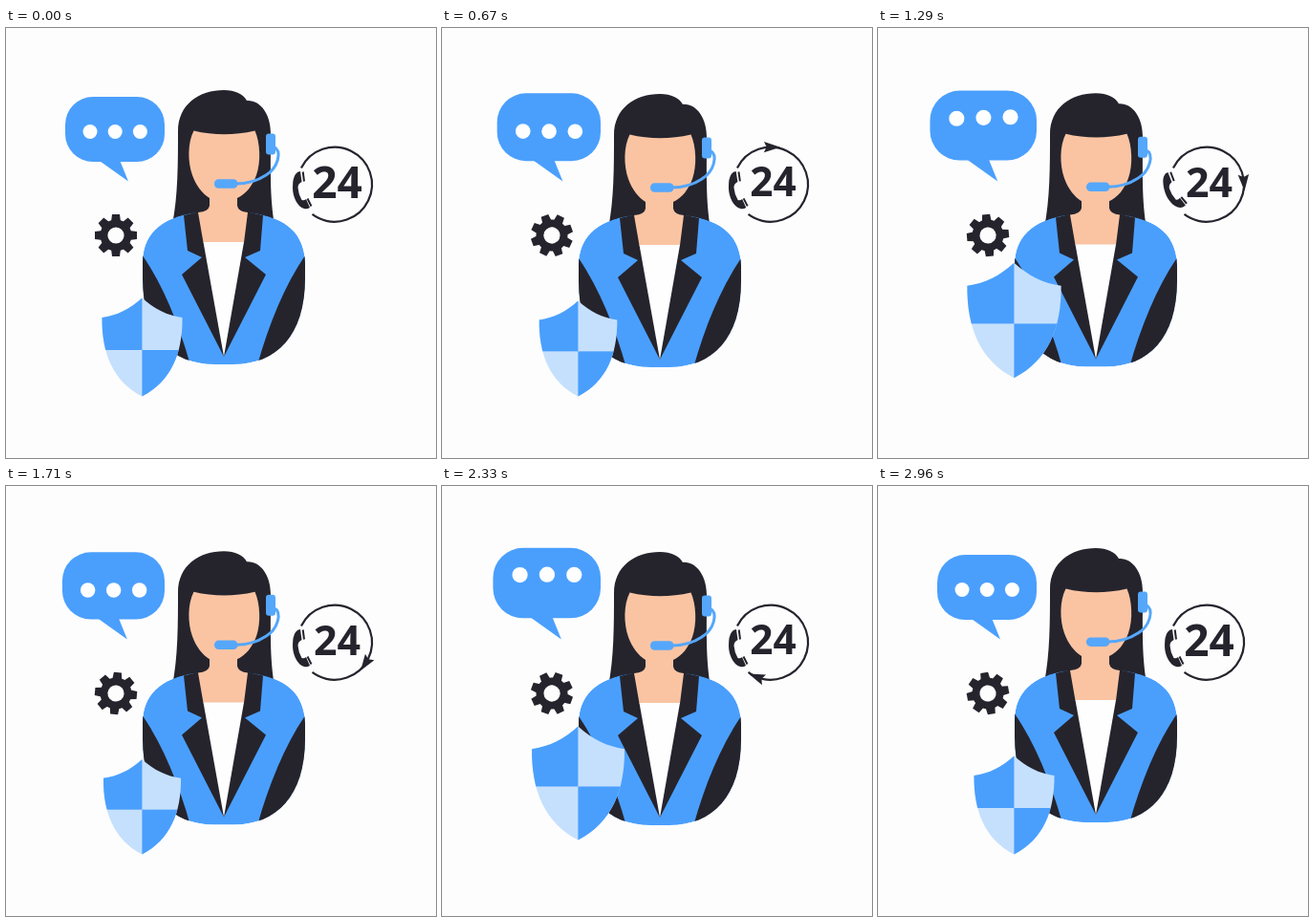
An HTML page with a canvas for the animation above (3 s loop, 450 by 450 pixels).

```html
<!DOCTYPE html>
<html lang="en">
<head>
<meta charset="utf-8">
<title>Support around the clock</title>
<style>
html, body { margin: 0; width: 100%; height: 100%; overflow: hidden; background: #fdfdfd; }
canvas { display: block; width: 450px; height: 450px; }
</style>
</head>
<body>
<canvas id="stage"></canvas>
<script>
const LOOP = 3000, FPS = 24, TAU = Math.PI * 2;
const BG = '#fdfdfd', BLUE = '#4a9ffd', LIGHT = '#c5e0fd', DARK = '#25242d', SKIN = '#fac4a3', WIRE = '#55a7fb';

const canvas = document.getElementById('stage');
const dpr = window.devicePixelRatio || 1;
canvas.width = canvas.height = 450 * dpr;
const ctx = canvas.getContext('2d');

// Value at t of a list of [time, value] keys
function track(t, keys, ease = u => (1 - Math.cos(Math.PI * u)) / 2) {
  for (let i = 1; i < keys.length; i++) {
    const [t0, a] = keys[i - 1], [t1, b] = keys[i];
    if (t <= t1) return a + (b - a) * ease((t - t0) / (t1 - t0));
  }
  return keys[keys.length - 1][1];
}
const linear = u => u;

function fill(d, color) {
  ctx.fillStyle = color;
  ctx.fill(new Path2D(d));
}
function line(d, color, width) {
  ctx.strokeStyle = color;
  ctx.lineWidth = width;
  ctx.stroke(new Path2D(d));
}
function disc(x, y, r, color) {
  ctx.fillStyle = color;
  ctx.beginPath();
  ctx.arc(x, y, r, 0, TAU);
  ctx.fill();
}
function box(x, y, w, h, r, color) {
  ctx.fillStyle = color;
  ctx.beginPath();
  ctx.roundRect(x, y, w, h, r);
  ctx.fill();
}
function group(draw, { x = 0, y = 0, scale = 1, turn = 0, dy = 0 }) {
  ctx.save();
  ctx.translate(x, y + dy);
  ctx.rotate(turn);
  ctx.scale(scale, scale);
  ctx.translate(-x, -y);
  draw();
  ctx.restore();
}

function head() {
  fill('M174 206C180 176 180 142 180 108C180 80 202 65 228 65C240 65 248 69 252 76C266 75 277 90 277 110C277 150 276 176 281 206Z', DARK);
  fill('M196.500 107.500Q228 115 260.500 107.500C266 120 267 140 262 154C258 165 251 174 242 178V200H213V178C205 173 199 165 195 154C190 140 190 120 196.500 107.500Z', SKIN);
  box(272, 110.5, 10, 22, 3, WIRE);
  line('M280 124C290 129 284 147 272 154C263 160 253 163 240 163', WIRE, 3);
  box(218, 158.3, 24.5, 9.5, 4.5, WIRE);
}

const TORSO = 'M200 193C160 198 143 218 143 245V262C143 322 173 352 218 352H238C283 352 313 322 313 262V246C312 216 295 198 254 193Z';

function body() {
  ctx.save();
  ctx.clip(new Path2D(TORSO));
  fill(TORSO, BLUE);
  fill('M141 235C164 268 181 310 193 353H141Z', DARK);
  fill('M315 235C292 268 275 310 263 353H315Z', DARK);
  ctx.restore();
  fill('M186 196L201 192.500H253L269 196L266 233L250 240L272 258L228 344L184 258L205 240L190 233Z', DARK);
  fill('M213 178V186Q212 192 201 193L206.500 224.500H249L253 193Q243 192 242 186V178Z', SKIN);
  fill('M206.500 224H249L228 344Z', '#fefefe');
}

function bubble(p) {
  const scale = track(p, [[0, 1], [410, 1.09], [900, 1], [1000, 1]]);
  group(() => {
    box(62, 72, 104, 68, 29, BLUE);
    fill('M95 137L128 160.500L118.500 137Z', BLUE);
    [380, 340, 300].forEach((peak, i) => {
      const hop = track(p, [[0, 0], [peak, -10.7], [700, 2], [950, 0], [1000, 0]]);
      disc(88 + i * 26.2, 108.5 + hop, 7.5, '#fefefe');
    });
  }, { x: 166, y: 160, scale });
}

function shield(p) {
  const scale = track(p, [[0, 1], [220, 1.18], [720, .965], [930, 1], [1000, 1]]);
  let dy = 0;
  if (p < 220) dy = track(p, [[0, 0], [220, -22.3]]);
  else if (p < 420) dy = -22.3 * (1 - ((p - 220) / 200) ** 2);
  group(() => {
    ctx.clip(new Path2D('M142.4 282.5C130 294 116 301 100.5 303C100 340 112 370 142.4 385.5C173 370 185 340 184.5 303C169 301 155 294 142.4 282.5Z'));
    ctx.fillStyle = LIGHT;
    ctx.fillRect(95, 280, 95, 110);
    ctx.fillStyle = BLUE;
    ctx.fillRect(95, 280, 47.4, 57);
    ctx.fillRect(142.4, 337, 48, 50);
  }, { x: 142.4, y: 385, scale, dy });
}

function gear(t) {
  ctx.save();
  ctx.translate(115, 217);
  ctx.rotate(2 * TAU * t / LOOP);
  for (let i = 0; i < 8; i++) {
    fill('M-5 -14L-4 -22H4L5 -14Z', DARK);
    ctx.rotate(TAU / 8);
  }
  disc(0, 0, 16.5, DARK);
  disc(0, 0, 8.6, BG);
  ctx.restore();
}

function phone(t) {
  const turn = track(t % 750, [[0, 0], [260, 0], [450, -.33], [700, 0], [750, 0]]);
  group(() => {
    fill('M303 153Q305 150 308 150L309.500 161Q305.500 163 305.500 167Q306 174 309.500 180Q312 181 314 179L318 188Q315 190 312 189C305 187 300 177 300 167Q300 157 303 153Z', DARK);
    line('M310.700 150.500L312 160.500M315.500 178.500L319.500 186.500', DARK, 2);
  }, { x: 309.5, y: 170, turn });
}

function clock(t, pulse) {
  const cx = 344, cy = 163.7, r = 39, rad = Math.PI / 180;
  ctx.strokeStyle = DARK;
  ctx.lineWidth = 2.2;
  ctx.beginPath();
  ctx.arc(cx, cy, r, 206 * rad, 487 * rad);
  ctx.stroke();

  const angle = track(t, [[0, 188], [375, 221], [1000, 328], [1290, 356], [1710, 394], [2330, 471], [3000, 548]], linear);
  const size = track(angle, [[188, 0], [200, 0], [212, 1], [485, 1], [500, 0], [548, 0]], linear);
  if (size > 0) {
    ctx.save();
    ctx.translate(cx, cy);
    ctx.rotate(angle * rad);
    ctx.translate(r, 0);
    ctx.scale(size, size);
    fill('M0 9.500L-5.700 -7.700L0 -5L5.700 -7.700Z', DARK);
    ctx.restore();
  }

  group(() => {
    ctx.fillStyle = DARK;
    ctx.font = '700 46px "Open Sans", "Noto Sans", sans-serif';
    ctx.textAlign = 'center';
    ctx.fillText('24', 346.5, 177.7);
  }, { x: 347, y: 162, scale: 1 - .105 * pulse });
  phone(t);
}

function draw(now) {
  const step = Math.floor((now % LOOP + 4) * FPS / 1000) % (LOOP * FPS / 1000);
  const t = step * 1000 / FPS, p = t % 1000;
  const pulse = Math.sin(Math.PI * p / 1000) ** 2;

  ctx.setTransform(dpr, 0, 0, dpr, 0, 0);
  ctx.fillStyle = BG;
  ctx.fillRect(0, 0, 450, 450);
  group(head, { dy: 5.2 * pulse });
  group(body, { dy: 3.9 * pulse });
  bubble(p);
  gear(t);
  shield(p);
  clock(t, pulse);
}

const start = performance.now();
function tick() {
  draw(performance.now() - start);
  requestAnimationFrame(tick);
}
tick();
</script>
</body>
</html>
```
